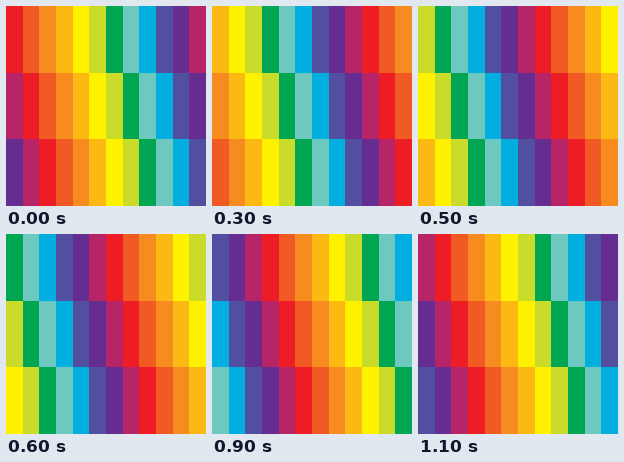
An HTML page with a canvas for the animation above (1200 ms loop, 200 by 200 pixels).

```html
<!DOCTYPE html>
<html lang="en">
<head>
<meta charset="utf-8">
<title>Rainbow columns</title>
<style>
  html, body { margin: 0; width: 100%; height: 100%; overflow: hidden; }
  canvas { display: block; width: 200px; height: 200px; }
</style>
</head>
<body>
<canvas id="stage" width="200" height="200"></canvas>
<script>
const colors = [
  '#ee1c25', '#f15a22', '#f68b1f', '#fdb913', '#fff200', '#cadb2a',
  '#00a651', '#6dc8bf', '#00aee0', '#524fa1', '#662d91', '#b72467'
];
const size = 200, rows = 3, count = colors.length, stepMs = 100;
const ctx = document.getElementById('stage').getContext('2d');
const edge = (i, n) => Math.round(i * size / n);

// Each row trails the one above by one colour; all move left one column per step.
function draw(step) {
  for (let r = 0; r < rows; r++) {
    const y = edge(r, rows), h = edge(r + 1, rows) - y;
    for (let c = 0; c < count; c++) {
      const x = edge(c, count);
      ctx.fillStyle = colors[(c + step - r + count) % count];
      ctx.fillRect(x, y, edge(c + 1, count) - x, h);
    }
  }
}

const start = performance.now();
function tick() {
  const time = Math.max(0, performance.now() - start);
  draw(Math.floor(time / stepMs) % count);
  requestAnimationFrame(tick);
}
tick();
</script>
</body>
</html>
```
